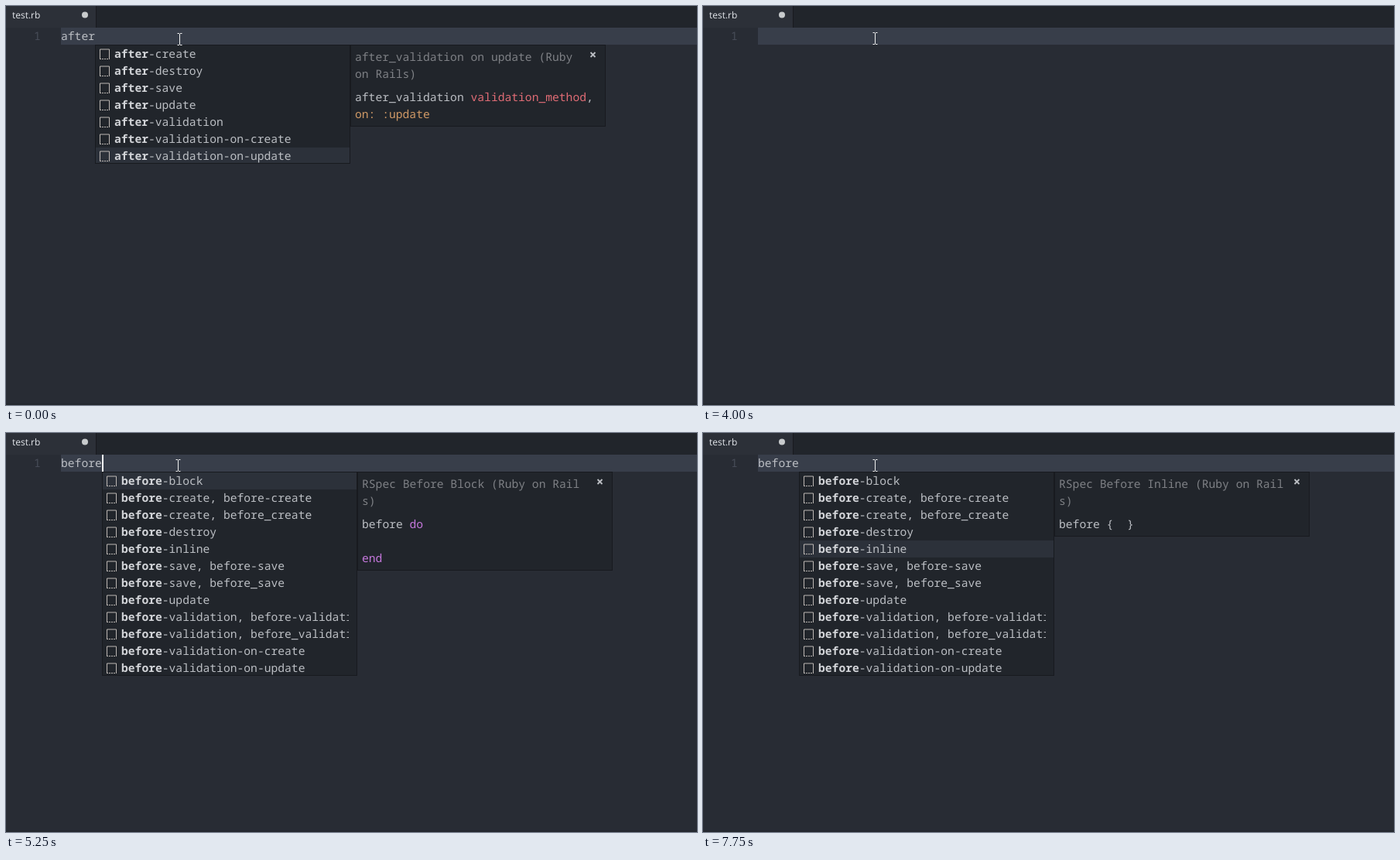
An HTML page for the animation above (8 s loop, 893 by 516 pixels).

```html
<!DOCTYPE html>
<html lang="en">
<head>
<meta charset="utf-8">
<title>Snippet autocomplete</title>
<style>
  html, body { margin: 0; width: 100%; height: 100%; overflow: hidden; background: #282c34; }
  svg { display: block; }
  text { font: 14.66px "Noto Sans Mono", monospace; fill: #bcbfc4; white-space: pre; text-rendering: geometricPrecision; }
  .tab { font: 12px "Open Sans", sans-serif; fill: #e2e5ea; }
  .match { font-weight: 700; fill: #d2d4d8; }
  .number { fill: #474c57; }
  .title { fill: #7e8085; }
  .red { fill: #e06c75; }
  .orange { fill: #d19a66; }
  .purple { fill: #c678dd; }
  .cyan { fill: #56b6c2; }
  .panel { fill: #21252b; stroke: #181a1f; }
  .line { fill: none; stroke: #bdb8b4; }
</style>
</head>
<body>
<svg width="893" height="516" viewBox="0 0 893 516">
  <rect width="893" height="28" fill="#21252b"/>
  <rect width="116" height="28" fill="#2c3038"/>
  <rect x="116" width="1" height="28" fill="#181a1f"/>
  <text class="tab" x="8" y="16">test.rb</text>
  <circle cx="102" cy="11.5" r="4" fill="#c8cbcd"/>
  <rect x="71" y="28" width="822" height="22" fill="#383e4a"/>
  <rect y="514" width="893" height="2" fill="#23272e"/>
  <text class="number" x="36" y="44">1</text>
  <g id="scene"></g>
</svg>
<script>
const LOOP = 8000, LEFT = 71, CHAR = 8.797, ROW = 22;
const scene = document.getElementById('scene');

const typed = [[-750, 'after'], [1500, 'aft'], [1750, 'af'], [2000, 'a'], [2500, ''],
  [4500, 'b'], [4750, 'be'], [5000, 'befo'], [5250, 'before']];
const selected = [[0, 6], [1500, -1], [4500, 0], [6250, 1], [6500, 2], [7000, 3], [7500, 4]];

const color = (name, s) => `<tspan class="${name}">${s}</tspan>`;
const method = color('orange', ':method');

const afterMenu = {
  items: ['create', 'destroy', 'save', 'update', 'validation', 'validation-on-create',
    'validation-on-update'].map(s => 'after-' + s),
  details: {
    6: [['after_validation on update (Ruby', 'on Rails)'],
      [`after_validation ${color('red', 'validation_method')},`, color('orange', 'on: :update')]]
  }
};
const pair = s => [`before-${s}, before-${s}`, `before-${s}, before_${s}`];
const beforeMenu = {
  items: ['before-block', ...pair('create'), 'before-destroy', 'before-inline', ...pair('save'),
    'before-update', ...pair('validation'), 'before-validation-on-create', 'before-validation-on-update'],
  details: [
    [['RSpec Before Block (Ruby on Rail', 's)'],
      ['before ' + color('purple', 'do'), '', color('purple', 'end')]],
    [['Ruby before_create callback (Ruby', 'on Rails)'], ['before_create ' + method]],
    [['before_create (Ruby on Rails)'], ['before_create ' + method]],
    [['before_destroy (Ruby on Rails)'], ['before_destroy ' + method]],
    [['RSpec Before Inline (Ruby on Rail', 's)'], ['before {  }']]
  ]
};

const latest = (list, t) => list.filter(([start]) => start <= t).pop();
const rect = (x, y, w, h, fill) => `<rect x="${x}" y="${y}" width="${w}" height="${h}" fill="${fill}"/>`;
const panel = (x, y, w, h) => `<rect class="panel" x="${x + .5}" y="${y + .5}" width="${w - 1}" height="${h - 1}"/>`;
const text = (x, y, s, name = '') => `<text class="${name}" x="${x}" y="${y}">${s}</text>`;

function list(x, { items }, row, prefix) {
  const height = items.length * ROW;
  const rows = items.map((item, i) => {
    const y = i * ROW;
    return `<path class="line" d="M6.5 ${y + 17}v-12h12v12"/>
      <path class="line" stroke-dasharray="2 1" d="M6 ${y + 17.5}h13"/>` +
      text(25, y + 16, color('match', prefix) + item.slice(prefix.length));
  }).join('');
  const scrollbar = prefix.length < 3 ? rect(x + 319, 51, 10, 166, '#3a3f4a') : '';
  return panel(x, 50, 330, height) + rect(x + 1, 51 + row * ROW, 328, Math.min(ROW, height - 2 - row * ROW), '#2c313a') +
    `<svg x="${x}" y="51" width="319" height="${height - 2}">${rows}</svg>` + scrollbar;
}

function detail(x, [title, code]) {
  const codeTop = 79 + title.length * ROW;
  const bottom = codeTop + (code.length - 1) * ROW + 11;
  return panel(x, 50, 330, bottom - 50) +
    title.map((s, i) => text(x + 6, 71 + i * ROW, s, 'title')).join('') +
    code.map((s, i) => text(x + 6, codeTop + i * ROW, s)).join('') +
    `<path d="M${x + 310.5} 60l6 6m0-6l-6 6" stroke="#bcbfc4" stroke-width="1.8"/>`;
}

function draw(t) {
  const [keyTime, word] = latest(typed, t);
  const row = latest(selected, t)[1];
  const caret = Math.round(LEFT + word.length * CHAR);
  const single = word === 'a';
  let out = single ? rect(LEFT, 28, 9, 22, '#33434e') : '';
  out += text(LEFT, 44, word, single ? 'cyan' : '');
  if (row >= 0) {
    const menu = t < 1500 ? afterMenu : beforeMenu;
    out += list(caret, menu, row, word) + detail(caret + 330, menu.details[row]);
  }
  if (Math.floor((t - keyTime) / 500) % 2 === 0) out += rect(caret, 28, 2, 22, '#f4f5f7');
  const [mx, my] = t < 500 ? [224.5, 43] : [222.5, 42];
  return out + `<path d="M${mx - 3} ${my - 7.5}h2.5m1 0h2.5M${mx} ${my - 7}v14M${mx - 3} ${my + 7.5}h2.5m1 0h2.5"
    fill="none" stroke="#f0f0f0"/>`;
}

let shown;
function frame() {
  const markup = draw(performance.now() % LOOP);
  if (markup !== shown) scene.innerHTML = shown = markup;
  requestAnimationFrame(frame);
}
frame();
</script>
</body>
</html>
```
